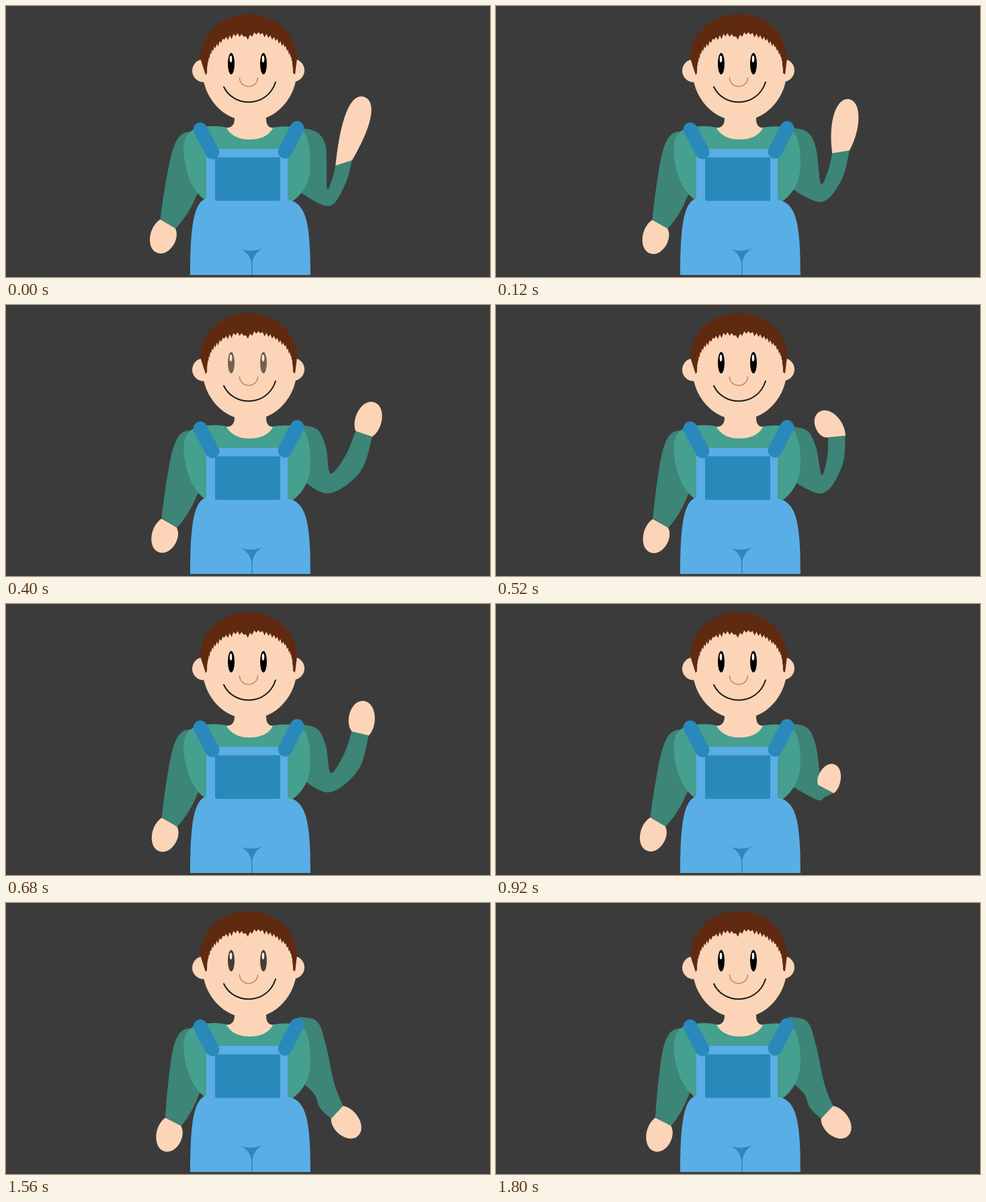
Animation of 720 by 404 pixels, one loop 2000 ms. Source, as an HTML page:

```html
<!DOCTYPE html>
<html lang="en">
<head>
<meta charset="utf-8">
<title>Waving man</title>
<style>
  html, body { margin: 0; width: 100%; height: 100%; overflow: hidden; background: #3b3b3b; }
  svg { display: block; width: 100%; height: 100%; }
  .skin { fill: #fcd5b8; }
  .sleeve { fill: #3c8577; }
  .shirt { fill: #45a08f; }
  .denim { fill: #5aaee6; }
  .dark { fill: #2a89bb; }
  .strap { stroke: #2a89bb; stroke-width: 21; stroke-linecap: round; }
  .line { fill: none; stroke: #1a1a1a; stroke-width: 2; stroke-linecap: round; }
</style>
</head>
<body>
<svg viewBox="0 0 720 404">
  <g id="restArm">
    <path class="sleeve" d="M274 187C254 186 248 212 244 245Q239 285 237 319L260 333Q278 312 288 283L300 260V200Z"/>
    <path class="skin" id="restHand"/>
  </g>
  <path class="sleeve" id="waveSleeve"/>
  <path class="skin" id="waveHand"/>

  <path class="shirt" d="M328 181Q310 177 290 181Q264 184 264 215Q268 272 300 292H425Q453 272 453 235Q453 190 436 181Q415 178 397 181Z"/>
  <path class="denim" d="M298 213H419V289C447 293 453 325 453 401H274C274 325 280 292 298 287Z"/>
  <rect class="dark" x="311" y="225.5" width="97" height="65" rx="2"/>
  <path class="dark" d="M342 359Q365 371 388 358Q368 366 366.500 384V401H365V384Q363 366 342 359Z"/>
  <path class="strap" d="M289 184L307 218M433 182L415 217"/>

  <path class="skin" d="M340 155V168Q340 181 328 182Q338 199 362 199Q388 199 397 182Q387 181 387 168V155Z"/>
  <circle class="skin" cx="294" cy="96.500" r="17"/>
  <circle class="skin" cx="427" cy="96" r="17"/>
  <ellipse class="skin" cx="362.500" cy="94" rx="70.500" ry="77.500"/>
  <path id="hair" fill="#5f2a10"/>
  <g id="eyes">
    <g id="eye">
      <ellipse cx="335" cy="86" rx="5" ry="16"/>
      <ellipse cx="334.500" cy="79" rx="1.800" ry="5" fill="#fff"/>
    </g>
    <use href="#eye" x="48"/>
  </g>
  <path class="line" d="M347.500 107A13.500 13 0 0 0 374.500 107" style="stroke:#c98f62;stroke-width:1.700"/>
  <path class="line" d="M324 120.500C338 151 388 153 401 113.500"/>
</svg>
<script>
const el = id => document.getElementById(id);
const mix = (a, b, k) => a.map((v, i) => v + (b[i] - v) * k);
const ease = k => k * k * (3 - 2 * k);

// Point at a distance from [x, y]; angle in degrees, 0 pointing right.
function polar([x, y], angle, r) {
  const a = angle * Math.PI / 180;
  return [x + r * Math.cos(a), y + r * Math.sin(a)];
}

// Pose: elbow x, y, wrist x, y, cuff angle, hand angle, hand length, swing of the other arm.
const reach = [479, 285, 502.5, 234, -18, 17, 103, 1];
const upright = [489, 272, 523.5, 201, 0, 0, 56, .2];
const inward = [485, 267, 507, 196, -6, -37, 45, .5];
const outward = [481, 266, 534, 192, 20, 21, 50, .77];
const folded = [480, 277, 491, 276, 28, 18, 39, 1];
const hanging = [472, 271, 492.5, 312, 133, 139, 47, 0];
const keys = [[0, reach], [240, upright], [380, outward], [520, inward], [760, outward],
  [920, folded], [1120, hanging], [2000, hanging]];
const blinks = [325, 1660];

function poseAt(t) {
  const i = keys.findIndex(key => key[0] > t);
  const [t0, from] = keys[i - 1], [t1, to] = keys[i];
  return mix(from, to, ease((t - t0) / (t1 - t0)));
}

// Smooth curve through the points, as path commands after the first one.
function smooth(points) {
  let d = '';
  for (let i = 0; i < points.length - 1; i++) {
    const p = points[i], q = points[i + 1];
    const before = points[i - 1] || p, after = points[i + 2] || q;
    const c1 = p.map((v, k) => v + (q[k] - before[k]) / 6);
    const c2 = q.map((v, k) => v - (after[k] - p[k]) / 6);
    d += `C${c1} ${c2} ${q}`;
  }
  return d;
}

function drawHand(node, [x, y], cuff, angle, length) {
  const w = Math.min(18.5, length * .4), side = length * length / 150;
  const [left, right] = [-13, 13].map(r => polar([0, 0], cuff - angle, r));
  node.setAttribute('d', `M${left}C${-1.4 * w} ${-side} ${-w} ${-length} 0 ${-length}` +
    `C${w} ${-length} ${1.4 * w} ${-side} ${right}Z`);
  node.setAttribute('transform', `translate(${x} ${y}) rotate(${angle})`);
}

function drawSleeve(node, elbow, wrist, cuff) {
  const top = 180 - cuff / 13, half = 14 + cuff / 25;
  const [crook, bottom] = [half, -half].map(r => polar(elbow, cuff / 3 - 90, r));
  const [left, right] = [-13, 13].map(r => polar(wrist, cuff, r));
  const dx = wrist[0] - elbow[0], dy = wrist[1] - elbow[1], bulge = Math.hypot(dx, dy) / 450;
  const bow = (p, q, k) => {
    const [x, y] = mix(p, q, .5);
    return [x - dy * bulge * k, y + dx * bulge * k];
  };
  const inner = [[436, top], [463, top + 7], [476, 212], crook, bow(crook, left, .3), left];
  const outer = [right, bow(right, bottom, 1), bottom, [436, elbow[1] - 8]];
  node.setAttribute('d', `M${inner[0]}${smooth(inner)}L${right}${smooth(outer)}Z`);
}

// Round outside, and a fringe of random spikes with a tuft near the middle.
function drawHair(node) {
  let seed = 7;
  const random = () => (seed = seed * 16807 % 2147483647) / 2147483647;
  let d = 'M297 103L289 78A72 66 0 0 1 433 78L430 102';
  for (let i = 0; i <= 64; i++) {
    const a = Math.PI * i / 64;
    const x = 363 + 64 * Math.cos(a);
    const tuft = 7 * Math.exp(-(((x - 358) / 8) ** 2));
    const spike = i % 2 ? 2 + 5 * random() : 0;
    d += `L${x} ${100 - 62 * Math.sin(a) ** .75 + tuft + spike}`;
  }
  node.setAttribute('d', d + 'Z');
}

function frame(now) {
  const t = Math.floor(now % 2000 / 40) * 40;
  const [ex, ey, wx, wy, cuff, angle, length, swing] = poseAt(t);
  drawSleeve(el('waveSleeve'), [ex, ey], [wx, wy], cuff);
  drawHand(el('waveHand'), [wx, wy], cuff, angle, length);
  el('restArm').setAttribute('transform', `rotate(${swing * 3.6} 265 200)`);
  el('eyes').setAttribute('opacity', Math.min(1, ...blinks.map(mid => Math.abs(t - mid) / 140)));
  requestAnimationFrame(frame);
}

drawHair(el('hair'));
drawHand(el('restHand'), [248.5, 326], 208, 196, 46);
frame(0);
</script>
</body>
</html>
```
